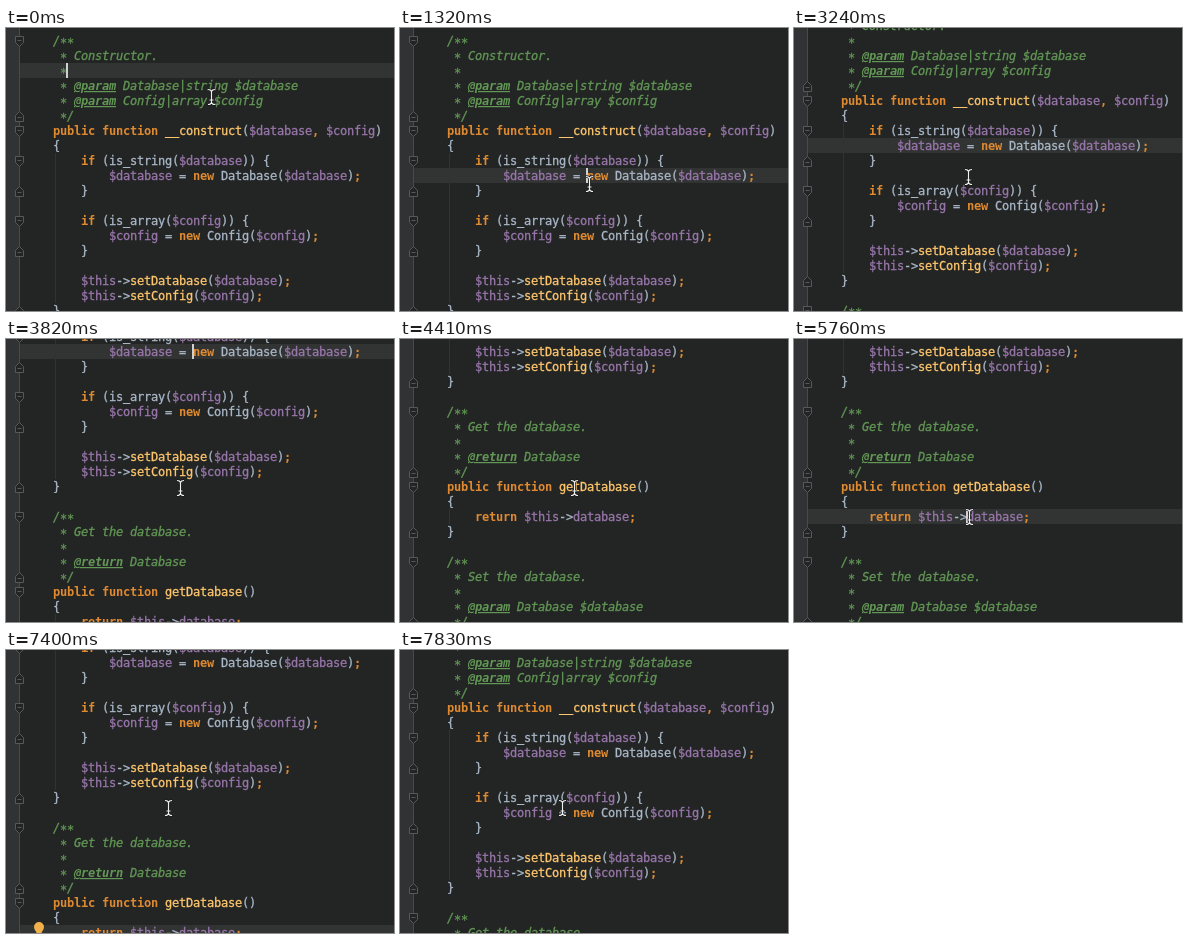
An HTML page for the animation above (8000 ms loop, 388x283 px).

```html
<!DOCTYPE html>
<html lang="en">
<head>
<meta charset="utf-8">
<title>Code editor</title>
<style>
  html, body { margin: 0; width: 100%; height: 100%; overflow: hidden; background: #232525; }
  svg { display: block; width: 388px; height: 283px; }
  text {
    font: 12px "DejaVu Sans Mono", "Liberation Mono", monospace;
    letter-spacing: -.2246px; white-space: pre;
    color: #a9b7c6; fill: currentColor; stroke: currentColor; stroke-width: .3px;
  }
  .keyword, .mark { color: #df8a30; font-weight: bold; stroke: none; }
  .name { color: #ffc66d; }
  .var { color: #9876aa; }
  .doc, .tag, .star { color: #629755; font-style: italic; }
  .tag { font-weight: bold; stroke: none; text-decoration: underline 1px; }
</style>
</head>
<body>
<svg id="stage" viewBox="0 0 388 283"></svg>
<script>
const LOOP = 8000, ROW = 15, TOP = 5, LEFT = 47, CHAR = 7;

const code = `/**
 * Constructor.
 *
 * @param Database|string $database
 * @param Config|array $config
 */
public function __construct($database, $config)
{
    if (is_string($database)) {
        $database = new Database($database);
    }

    if (is_array($config)) {
        $config = new Config($config);
    }

    $this->setDatabase($database);
    $this->setConfig($config);
}

/**
 * Get the database.
 *
 * @return Database
 */
public function getDatabase()
{
    return $this->database;
}

/**
 * Set the database.
 *
 * @param Database $database
 */`.split("\n");

const codeRules = [
  ["keyword", /^(public|function|return|new|if)\b/],
  ["var", /^(\$\w+|database\b)/],
  ["name", /^(__construct|[sg]et[A-Z]\w*)/],
  ["mark", /^[;,]/],
  ["plain", /^(\w+|[^\w\s$;,]+)/]
];
const docRules = [["tag", /^@\w+/], ["star", /^\*+/], ["doc", /^[^@*\s][^@*]*/]];

const stepAt = t => Math.max(-1, Math.floor((t - 130) / 147.5));

const scrolls = [
  { from: 20, to: 21, path: [0, 30] },
  { from: 21, to: 29, path: [30, 240] },
  { from: 45, to: 46, path: [240, 210] },
  { from: 46, to: 52, path: [210, 45] }
];
// Each swoop bends towards its middle point.
const swoops = [
  { from: -1, to: 8, path: [[205, 69], [325, 110], [189, 156]] },
  { from: 11, to: 16, path: [[189, 156], [248, 213], [174, 149]] },
  { from: 34, to: 37, path: [[174, 149], [270, 130], [175, 178]] },
  { from: 38, to: 42, path: [[175, 178], [160, 215], [162, 158]] }
];
const clicks = [
  { at: -1, row: 2, col: 2 },
  { at: 8, row: 9, col: 20 },
  { at: 37, row: 27, col: 18 }
];
const BLINK = 3.5, BULB_STEP = 41;

const stage = document.getElementById("stage");
const rowTop = row => TOP + row * ROW;

function add(parent, tag, attrs, content) {
  const el = document.createElementNS("http://www.w3.org/2000/svg", tag);
  for (const key in attrs) el.setAttribute(key, attrs[key]);
  if (content) el.textContent = content;
  return parent.appendChild(el);
}

function drawText(line, row) {
  const rules = /^\s*(\/\*|\*)/.test(line) ? docRules : codeRules;
  let col = 0;
  while (col < line.length) {
    const rest = line.slice(col);
    const rule = rules.find(([, re]) => re.test(rest));
    if (!rule) { col++; continue; }
    const [name, re] = rule;
    const token = rest.match(re)[0];
    const drop = name === "star" ? 14 : 12;
    add(page, "text", { x: LEFT + col * CHAR, y: rowTop(row) + drop, class: name }, token);
    col += token.length;
  }
}

function drawFold(row, flip) {
  const g = add(page, "g", {
    transform: `translate(13.5 ${rowTop(row) + 8.5}) scale(1 ${flip})`,
    fill: "#232525", stroke: "#565859"
  });
  add(g, "path", { d: "M-4-5H4V1L0 5L-4 1Z" });
  add(g, "path", { d: "M-2-1H2" });
}

add(stage, "rect", { width: 13, height: 283, fill: "#303233" });

const page = add(stage, "g", {});
const band = add(page, "rect", { x: 14, width: 374, height: ROW, fill: "#323434" });
add(page, "path", { d: "M13.5 0V600", stroke: "#484a4b" });

let inBody = false;
code.forEach((line, row) => {
  if (line === "}") inBody = false;
  if (inBody) add(page, "path", { d: `M49.5 ${rowTop(row)}v${ROW}`, stroke: "#313333" });
  if (line === "{") inBody = true;
  if (/\/\*\*|public|if /.test(line)) drawFold(row, 1);
  if (/\*\/|}/.test(line)) drawFold(row, -1);
  drawText(line, row);
});

const bulb = add(page, "g", { transform: `translate(33 ${rowTop(27)})` });
add(bulb, "path", { d: "M-2.5 8C-2.5 6-5 5-5 2A5 5 0 0 1 5 2C5 5 2.5 6 2.5 8Z", fill: "#f2b04b" });
add(bulb, "path", { d: "M-2.5 9.5H2.5M-2 11.5H2", stroke: "#b4b6b7", "stroke-width": 1.3 });

const caret = add(page, "rect", { width: 2, height: ROW, fill: "#d0d0d0" });

const mouse = add(stage, "g", { fill: "none" });
const beam = "M-3.5-7.5Q-.5-7.5 0-5.5Q.5-7.5 3.5-7.5M0-5.5V5.5M-3.5 7.5Q-.5 7.5 0 5.5Q.5 7.5 3.5 7.5M-2 3H2";
add(mouse, "path", { d: beam, stroke: "#151515", "stroke-width": 2.6 });
add(mouse, "path", { d: beam, stroke: "#f0f0f0", "stroke-width": 1.2 });

// Latest move that has begun, and how far it has come.
function moveAt(moves, k) {
  const move = moves.filter(m => m.from <= k).pop() || moves[0];
  const p = (k - move.from) / (move.to - move.from);
  return [move.path, Math.min(1, Math.max(0, p))];
}

function scrollAt(k) {
  const [[a, b], p] = moveAt(scrolls, k);
  return Math.round((a + (b - a) * p) / ROW) * ROW;
}

function mouseAt(k) {
  const [[a, b, c], p] = moveAt(swoops, k);
  const q = 1 - p;
  return a.map((v, i) => Math.round(q * q * v + 2 * q * p * b[i] + p * p * c[i]));
}

function draw(t) {
  const k = stepAt(t);
  const [x, y] = mouseAt(k);
  const { at, row, col } = clicks.filter(c => c.at <= k).pop();
  const lit = Math.floor((k - at) / BLINK) % 2 === 0;

  page.setAttribute("transform", `translate(0 ${-scrollAt(k)})`);
  mouse.setAttribute("transform", `translate(${x + .5} ${y})`);
  band.setAttribute("y", rowTop(row));
  caret.setAttribute("x", LEFT + col * CHAR - 1);
  caret.setAttribute("y", rowTop(row));
  caret.setAttribute("visibility", lit ? "visible" : "hidden");
  bulb.setAttribute("visibility", k >= BULB_STEP ? "visible" : "hidden");
}

const start = performance.now();
function tick() {
  draw((performance.now() - start) % LOOP);
  requestAnimationFrame(tick);
}
tick();
</script>
</body>
</html>
```
